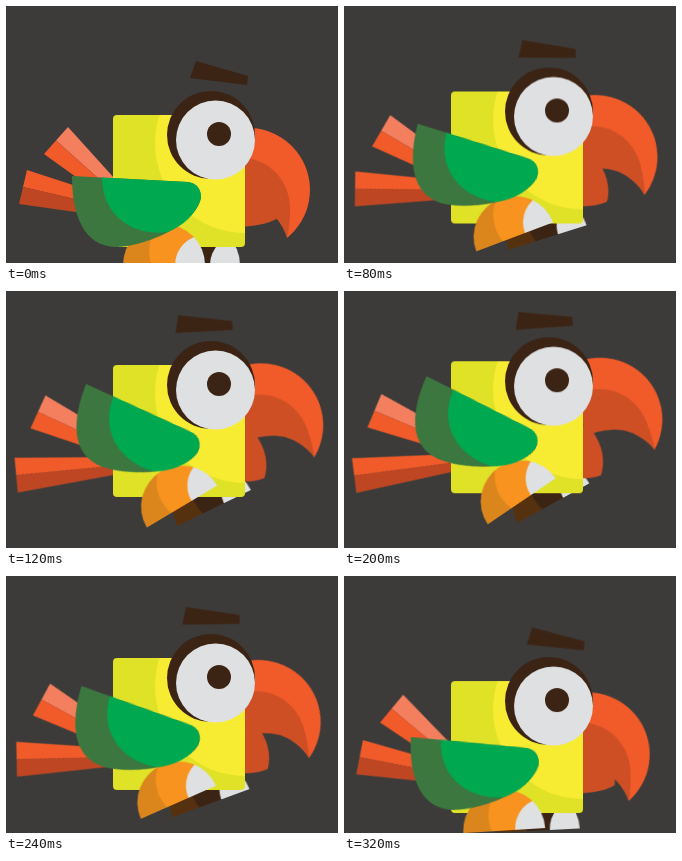
Animation, 332 px wide and 257 px high, one loop 360 ms. Source, as an HTML page:

```html
<!DOCTYPE html>
<html lang="en">
<head>
<meta charset="utf-8">
<title>Flapping parrot</title>
<style>
html, body { margin: 0; width: 100%; height: 100%; overflow: hidden; background: #3c3b39; }
svg { display: block; width: 332px; height: 257px; }
.orange { fill: #f15a29; }
.rust { fill: #cf4f25; }
.brown { fill: #3c2415; }
.white { fill: #dee0e2; }
</style>
</head>
<body>
<svg viewBox="0 0 332 257">
  <defs>
    <clipPath id="bodyClip"><rect x="107" y="109" width="132" height="132" rx="4"/></clipPath>
    <clipPath id="legClip"><path d="M117 259A41 41 0 0 1 199 259Z"/></clipPath>
    <clipPath id="beakClip"><path id="beakShape" d="M225 124.200A62 62 0 0 1 281 232C277 217 265 205 257 201Q242 193 224 193.500Z"/></clipPath>
  </defs>
  <g id="bird">
    <g id="rearLeg">
      <g transform="translate(35 0)" clip-path="url(#legClip)">
        <rect x="110" y="210" width="100" height="50" fill="#55310f"/>
        <circle class="brown" cx="182" cy="245" r="39"/>
        <circle class="white" cx="199" cy="259" r="30"/>
      </g>
    </g>

    <g id="lowTail">
      <path class="orange" d="M21 164L116 195L114 203.600L17 181Z"/>
      <path fill="#bf4622" d="M17 181L114 203.600L112 212L13 198Z"/>
    </g>
    <g id="highTail">
      <path fill="#f37f5e" d="M62 121L109 173L102 181L50 134.500Z"/>
      <path class="orange" d="M50 134.500L102 181L95 189L38 148Z"/>
    </g>

    <path id="jaw" class="rust" d="M225 160L255 170C268 182 274 198 272 212Q258 221 225 221Z"/>
    <g id="beak" clip-path="url(#beakClip)">
      <rect class="orange" x="215" y="115" width="95" height="125"/>
      <path class="rust" d="M220 152H239C263 154 284 174 284 203Q284 219 281 233L215 240Z"/>
    </g>

    <g clip-path="url(#bodyClip)">
      <rect x="107" y="109" width="132" height="132" fill="#dfe226"/>
      <circle cx="239" cy="137" r="90" fill="#f8ec32"/>
    </g>

    <circle class="brown" cx="205" cy="129" r="44"/>
    <circle class="white" cx="209.500" cy="134" r="39.500"/>
    <circle class="brown" cx="213" cy="128" r="12"/>
    <g id="brow"><path class="brown" d="M190 55L242 70L241 79L184 72Z"/></g>

    <g id="frontLeg">
      <g clip-path="url(#legClip)">
        <rect x="110" y="210" width="100" height="50" fill="#db861d"/>
        <circle cx="182" cy="245" r="39" fill="#f7931e"/>
        <circle class="white" cx="199" cy="259" r="30"/>
      </g>
    </g>

    <g id="wing">
      <path fill="#3b773f" d="M66 170L182 176Q195 178 195 192C190 218 140 241 108 241C78 239 66 210 66 170Z"/>
      <path fill="#00a850" d="M96 171.500L182 176Q195 178 195 192C190 208 178 219 162 226C128 231 96 210 96 171.500Z"/>
    </g>
  </g>
</svg>
<script>
// Height of the flap at each 40 ms step, 0 = lowest, 1 = highest.
const flap = [0, 0.25, 0.5, 0.745, 1, 0.825, 0.575, 0.33, 0.085];
const browNudge = [0, -1, -2, -3.5, 1, 0, 1, 0, 0];
const rise = 47;
const startTime = document.timeline.currentTime;

function play(id, pose) {
  const steps = [...flap, flap[0]].map((u, i) => ({
    offset: i / flap.length,
    transform: pose(u, i % flap.length),
    easing: 'steps(1, end)'
  }));
  const part = document.getElementById(id);
  const motion = part.animate(steps, { duration: 40 * flap.length, iterations: Infinity });
  motion.startTime = startTime;
  return part;
}

function swing(id, angle, x, y, nudge = []) {
  const pose = (u, i) => `translate(${nudge[i] || 0}px, 0px) rotate(${angle * u}deg)`;
  play(id, pose).style.transformOrigin = `${x}px ${y}px`;
}

play('bird', u => `translate(0px, ${-rise * u}px)`);
swing('rearLeg', -35, 185.5, 223);
swing('frontLeg', -41.4, 151.7, 222);
swing('lowTail', -24.8, 131, 221);
swing('highTail', -23, 112, 205);
swing('jaw', 13.3, 207, 139);
swing('beak', -26.6, 207, 138.6);
swing('brow', -13.3, 207, 139, browNudge);
swing('wing', 29, 183, 186);
</script>
</body>
</html>
```
